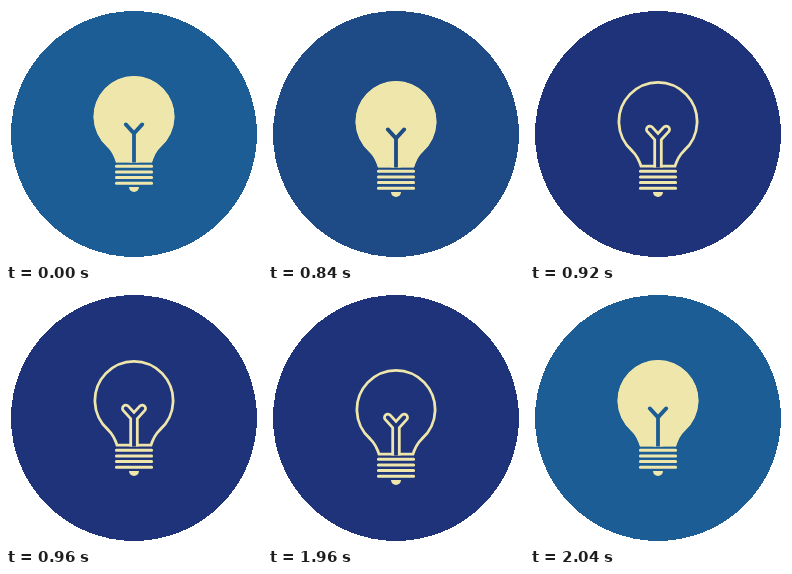
An HTML page for the animation above (3040 ms loop, 256 px wide and 256 px high).

```html
<!DOCTYPE html>
<html lang="en">
<head>
<meta charset="utf-8">
<title>Light bulb switch</title>
<style>
  html, body { margin: 0; width: 100%; height: 100%; overflow: hidden; background: #fff; }
  svg { display: block; width: 100%; height: 100%; }
  #disc { shape-rendering: crispEdges; }
  #bulb { fill: none; stroke: #eee6aa; stroke-linecap: round; stroke-linejoin: round; }
</style>
</head>
<body>
<svg viewBox="0 0 256 256">
  <defs>
    <path id="glass" d="M110 156.5C108 150 105.5 145 101 140.7A40.5 40.5 0 1 1 155 140.7C150.5 145 148 150 146 156.5Z"/>
    <path id="filament" d="M119.8 118.4L128 127.4L136.2 118.4M128 127.4V160"/>
    <clipPath id="inside"><use href="#glass"/></clipPath>
  </defs>
  <circle id="disc" cx="128" cy="128" r="123"/>
  <g id="bulb">
    <g clip-path="url(#inside)">
      <use id="body" href="#glass" stroke-width="5.6"/>
      <use href="#filament" stroke-width="9.4"/>
      <use id="wire" href="#filament" stroke-width="3.8"/>
    </g>
    <path d="M110.4 160.2H145.6M110.4 165.9H145.6M110.4 171.5H145.6M110.4 177.2H145.6" stroke-width="3"/>
    <path d="M123 181H133A5 5 0 0 1 123 181Z" fill="#eee6aa" stroke="none"/>
  </g>
</svg>
<script>
  const LOOP = 3040, STEP = 40, OFF_AT = 840, ON_AT = 1920;
  const PRESS = [5, 9, 5];
  const BRIGHT = '#1c5d96', MIDDLE = '#1e4a86', DARK = '#1e3379';
  const [disc, bulb, body, wire] =
    ['disc', 'bulb', 'body', 'wire'].map(id => document.getElementById(id));

  function draw() {
    const time = performance.now() % LOOP;
    const offStep = Math.floor((time - OFF_AT) / STEP);
    const onStep = Math.floor((time - ON_AT) / STEP);
    const drop = PRESS[offStep] ?? PRESS[onStep] ?? 0;
    const lit = offStep < 1 || onStep >= 2;
    const color = offStep === 0 || onStep === 2 ? MIDDLE : lit ? BRIGHT : DARK;

    disc.setAttribute('fill', color);
    wire.setAttribute('stroke', color);
    body.setAttribute('fill', lit ? '#eee6aa' : 'none');
    bulb.setAttribute('transform', `translate(0 ${drop})`);
    requestAnimationFrame(draw);
  }
  draw();
</script>
</body>
</html>
```
